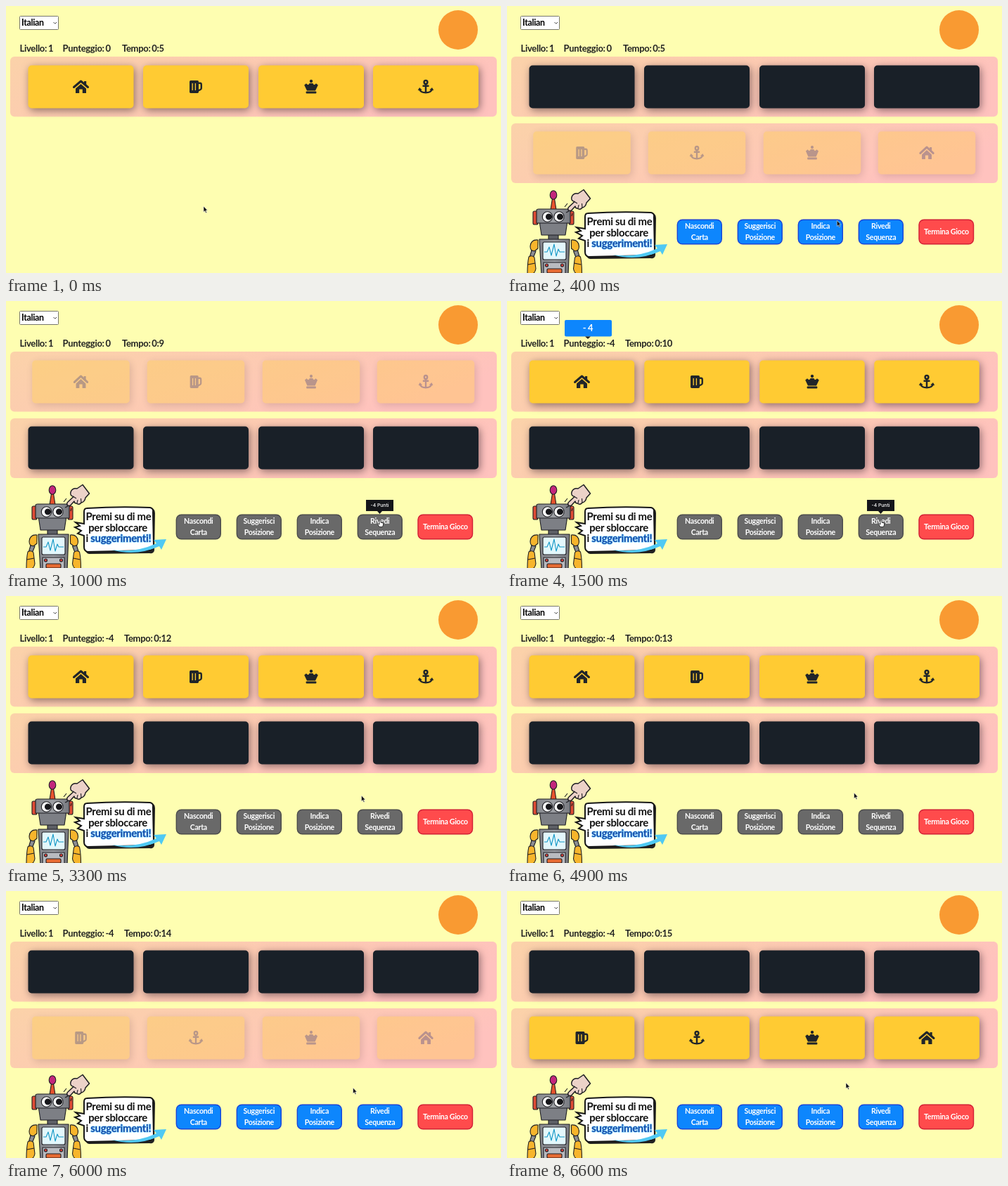
An HTML page that plays this animation: 704x380 px, repeating every 6700 ms.

```html
<!DOCTYPE html>
<html lang="it">
<head>
<meta charset="utf-8">
<style>
  html, body { margin: 0; width: 100%; height: 100%; overflow: hidden; background: #fefeb1; }
  svg { display: block; width: 704px; height: 380px; font: 700 13px Lato, "Open Sans", sans-serif; letter-spacing: -.3px; }
  .card { filter: drop-shadow(2px 3px 6px rgba(60, 40, 50, .58)); }
  .btn text { font-size: 10.6px; fill: #fff; text-anchor: middle; }
  .ink { stroke: #1d1d22; stroke-width: 1.1; stroke-linejoin: round; }
</style>
</head>
<body>
<svg id="stage" viewBox="0 0 704 380">
  <defs>
    <linearGradient id="peach" x1="0" y1="0" x2="1" y2=".35">
      <stop offset="0" stop-color="#fbd2a9"/><stop offset=".6" stop-color="#fdc9b4"/><stop offset="1" stop-color="#ffc2be"/>
    </linearGradient>
    <linearGradient id="metal"><stop offset="0" stop-color="#85878c"/><stop offset=".5" stop-color="#9c9ea3"/><stop offset="1" stop-color="#77797f"/></linearGradient>
    <g id="house" fill="#212529">
      <path d="M-10 .5 L0 -8 L10 .5" fill="none" stroke="#212529" stroke-width="3" stroke-linecap="round" stroke-linejoin="round"/>
      <path d="M4.5-8H7.7V-2L4.5-4.5Z M-7.5 2.4 L0-4 L7.5 2.4V9H2.3V3.5H-2.3V9H-7.5Z"/>
    </g>
    <g id="beer" fill="#212529">
      <rect x="-9" y="-9" width="13" height="18" rx="1.7"/>
      <path d="M3-5.2H6Q7.8-5.2 7.8-3V2Q7.8 3.4 6.5 4L3 5.6" fill="none" stroke="#212529" stroke-width="2.4"/>
      <path d="M-4.8-5V5M-.6-5V5" stroke="#ffcb33" stroke-width="1.3"/>
    </g>
    <g id="queen" fill="#212529">
      <circle cy="-8" r="2.2"/>
      <path d="M-9.8-2.6 L-7-4.8 L-5-3 Q-3-2.6-2.5-5H2.5Q3-2.6 5-3L7-4.8 L9.8-2.6 L6 5.4H-6Z"/>
      <rect x="-7.4" y="6.4" width="14.8" height="3.2" rx="1"/>
    </g>
    <g id="anchor" fill="none" stroke="#212529" stroke-width="2.5">
      <circle cy="-6.5" r="2.4"/>
      <path d="M0-4V8M-4.5-1.2H4.5M-9 3.5Q-7.5 8.3 0 8.3Q7.5 8.3 9 3.5"/>
      <path d="M-10.8 4.8L-9 1.5L-5.8 4.2ZM10.8 4.8L9 1.5L5.8 4.2Z" fill="#212529" stroke-width=".6"/>
    </g>
    <g id="arm">
      <path d="M-23 333Q-33 332-34 342Q-34 349-28 349L-23 345Z" fill="#f7b52c"/>
      <path d="M-32 348L-35 358L-30 359L-26 349Z" fill="#8b8d92"/>
      <path d="M-36 357Q-31 354-28 358L-26 374Q-27 380-32 382L-38 382Q-38 366-36 357Z" fill="#f7b52c"/>
      <path d="M-37 368L-27 366" fill="none"/>
    </g>
  </defs>

  <rect width="704" height="380" fill="#fefeb1"/>
  <rect x="19.5" y="14.5" width="55" height="19" rx="1" fill="#fff" stroke="#77776b"/>
  <text x="22" y="28.3" font-size="12.4">Italian</text>
  <path d="M67.5 23L69.8 25.3L72 23" fill="none" stroke="#444"/>
  <circle cx="643" cy="34" r="28" fill="#f99a32"/>

  <g fill="#222" word-spacing="-1">
    <text x="19.5" y="65">Livello: 1</text>
    <text id="score" x="80.5" y="65"></text>
    <text id="time" y="65"></text>
  </g>

  <rect x="6" y="72" width="692" height="85.5" rx="6" fill="url(#peach)"/>
  <g id="top"></g>

  <g id="play">
    <rect x="6" y="167" width="692" height="85" rx="6" fill="url(#peach)"/>
    <g id="bottom"></g>

    <g id="robot" class="ink">
      <use href="#arm" x="67"/>
      <use href="#arm" transform="translate(68.5 0) scale(-1 1)"/>
      <rect x="59" y="325" width="14" height="8" fill="#5e6066"/>
      <path d="M46 332H89L87 383H49Z" fill="url(#metal)"/>
      <rect x="51" y="336" width="33" height="25" rx="2" fill="#e3f7fb"/>
      <path d="M53 350H57L60 343L63 355L67 339L70 356L73 346L75 350H82" fill="none" stroke="#1598c6"/>
      <rect x="52" y="365" width="31" height="16" fill="#b9bbc0"/>
      <circle cx="56.5" cy="369" r="2" fill="#e9443d"/><circle cx="78.5" cy="369" r="2" fill="#e9443d"/>
      <rect x="57" y="374" width="21" height="6" rx="1.5" fill="#e66a32"/>
      <path d="M64.5 274H67.5L70 290H62Z" fill="#e8532d"/>
      <ellipse cx="66" cy="269" rx="4.8" ry="6.2" fill="#c3267c"/>
      <rect x="37" y="292" width="7" height="19" rx="2" fill="#df4c35"/>
      <rect x="88" y="292" width="7" height="19" rx="2" fill="#df4c35"/>
      <path d="M46 306H86L83 326H49Z" fill="#7d7f85"/>
      <path d="M42 291Q42 289 45 289H87Q90 289 90 291V309H42Z" fill="url(#metal)"/>
      <circle cx="57.5" cy="300" r="7.2" fill="#fff"/><circle cx="74" cy="300" r="7.2" fill="#fff"/>
      <circle cx="59.5" cy="300" r="4" fill="#16161a"/><circle cx="75.5" cy="300" r="4" fill="#16161a"/>
    </g>

    <g class="ink" stroke-width="1.5">
      <path d="M87.5 291Q85.5 288 88.5 285.5L96 278.5Q90.5 277 92 272Q94 266 101 267L109 261.5L118.5 274L113 280Q112 286 107 287Q104 291 100 288Q97 288 97 285L91 291.5Z" fill="#ecd2c8" style="stroke-width:1.5"/>
      <path d="M96 278.5L100 281M101 288L102 283M107 287L106.5 281" fill="none"/>
      <path d="M82 286L86 281M84 294L88 292M93 295L92 299" fill="none"/>
    </g>

    <path d="M116 297L207 295Q212 296 212 302L211 355Q210 360 204 359L118 360Q113 359 113 352Z" fill="#222"/>
    <path d="M115 295Q160 292 205 294Q210 295 209 301L210 349Q209 355 203 355L116 357Q111 356 111 350V334L102 331L107 327L98 322L105 320L99 315L111 317V300Q111 295 115 295Z" fill="#fff" stroke="#161616" stroke-width="2"/>
    <path d="M150 354Q184 359 214 345L210 340L228 339L221 354L218 349Q185 364 150 354Z" fill="#4fc9f3"/>
    <g font-size="14.9" text-anchor="middle" fill="#111">
      <text x="160" y="312">Premi su di me</text>
      <text x="159" y="328">per sbloccare</text>
      <text x="160" y="343">i <tspan fill="#1549a8" stroke="#8fdcff" stroke-width="1.4" paint-order="stroke">suggerimenti!</tspan></text>
    </g>
    <g id="buttons"></g>
  </g>

  <g id="popup" text-anchor="middle">
    <rect x="82" y="27" width="67" height="23.5" rx="2" fill="#0d86fd"/>
    <path d="M111 50.5H119L115 54Z" fill="#222"/>
    <text x="115" y="43" fill="#fff">- 4</text>
  </g>
  <g id="tip">
    <path d="M512 283H551V299H535L531.5 303L528 299H512Z" fill="#15161a"/>
    <text x="531.5" y="293.4" fill="#fff" font-family="Inter, sans-serif" font-weight="500" font-size="6.8" letter-spacing="0" text-anchor="middle">-4 Punti</text>
  </g>
  <path id="arrow" d="M0 0V8.2L1.9 6.5L3.2 9.5L4.5 9L3.2 6H5.6Z" fill="#111" stroke="#fff" stroke-width=".5"/>
  <path id="hand" d="M-1 0Q.2-1 1 0V3.2L4.5 4V7L3.3 9.5H-.8L-3.5 5.8L-2.6 5L-1 6Z" fill="#fff" stroke="#111" stroke-width=".8"/>
</svg>
<script>
const LOOP = 6700, STEP = 100;
const START = 100, HOVER = 500, REVIEW = 700, PENALTY = 1400, LEAVE = 2500, RETURN = 5700;
const CARD_X = [31.5, 195, 359, 522];
const TOP_ICONS = ["house", "beer", "queen", "anchor"];
const BOTTOM_ICONS = ["beer", "anchor", "queen", "house"];
const SECONDS = [[0, 5], [500, 9], [1400, 10], [2300, 11], [3300, 12], [4300, 13], [5300, 14], [6400, 15]];
const FLIP = [[0, 90], [.4, -20], [.6, 10], [.8, -5], [1, 0]];
const POINTER = [[0, 281, 285], [100, 281, 285], [500, 532, 312], [2500, 532, 312], [2800, 505.5, 284],
  [3900, 505.5, 284], [4100, 493.5, 282], [4800, 493.5, 282], [4900, 493.5, 280], [6300, 493.5, 280], [6600, 482, 273]];

const $ = id => document.getElementById(id);
const show = (id, on) => $(id).style.display = on ? "" : "none";
const lerp = (a, b, k) => a + (b - a) * k;
const easeIn = k => k ** 1.7;

// Interpolates rows of [position, ...values].
function along(rows, at, ease = k => k) {
  const i = rows.findIndex(row => row[0] > at);
  if (i < 0) return rows.at(-1).slice(1);
  const [a, b] = [rows[i - 1], rows[i]];
  const k = ease((at - a[0]) / (b[0] - a[0]));
  return a.slice(1).map((v, j) => lerp(v, b[j + 1], k));
}

function buildRow(id, y, icons) {
  $(id).innerHTML = CARD_X.map((x, i) => `<g transform="translate(${x + 75} ${y})"><g class="card">
    <rect x="-75" y="-30.5" width="150" height="61" rx="5"/><use href="#${icons[i]}"/></g></g>`).join("");
}

function buildButtons() {
  const labels = [["Nascondi", "Carta"], ["Suggerisci", "Posizione"], ["Indica", "Posizione"], ["Rivedi", "Sequenza"]];
  $("buttons").innerHTML = labels.map(([a, b], i) => `<g class="btn" transform="translate(${242 + 86 * i} 304)">
    <rect class="help" x=".3" y=".3" width="63" height="34.5" rx="7" stroke-width="1.4"/>
    <text x="31.8" y="13">${a}</text><text x="31.8" y="28.8">${b}</text></g>`).join("") +
    `<g class="btn"><rect x="586" y="304.3" width="77.5" height="34.5" rx="7" fill="#ff4b4c" stroke="#d21f35" stroke-width="1.4"/>
    <text x="625" y="325">Termina Gioco</text></g>`;
}

function drawRow(id, faceUp, age) {
  const p = Math.max(0, Math.min(1, age / 1000));
  const [angle] = faceUp ? along(FLIP, p, easeIn) : [0];
  const opacity = faceUp ? easeIn(Math.min(1, p / .6)) : 1;
  for (const card of $(id).querySelectorAll(".card")) {
    card.setAttribute("transform", `scale(${Math.max(.001, Math.cos(angle * Math.PI / 180))} 1)`);
    card.setAttribute("opacity", opacity);
    card.firstElementChild.setAttribute("fill", faceUp ? "#ffcb33" : "#192028");
    card.lastElementChild.style.display = faceUp ? "" : "none";
  }
}

function draw(t) {
  const reviewing = t >= REVIEW && t < RETURN;
  const hovering = t >= HOVER && t < LEAVE;
  const penalized = t >= PENALTY;

  drawRow("top", t < START || reviewing, reviewing ? t - REVIEW : 1000);
  const shownAt = t >= RETURN ? RETURN : START;
  drawRow("bottom", !reviewing, t < RETURN && t >= HOVER ? 1000 : t - shownAt);
  show("play", t >= START);

  for (const rect of document.querySelectorAll(".help")) {
    rect.setAttribute("fill", reviewing ? "#696969" : "#0d86fd");
    rect.setAttribute("stroke", reviewing ? "#4c4c4c" : "#1b45d8");
  }

  $("score").textContent = "Punteggio: " + (penalized ? -4 : 0);
  $("time").textContent = "Tempo: 0:" + SECONDS.findLast(row => row[0] <= t)[1];
  $("time").setAttribute("x", penalized ? 168 : 165);
  show("popup", penalized && t < 2700);
  show("tip", hovering);
  show("hand", hovering);
  show("arrow", !hovering);
  const place = `translate(${along(POINTER, t).join(" ")})`;
  $("hand").setAttribute("transform", place);
  $("arrow").setAttribute("transform", place);
}

buildRow("top", 115, TOP_ICONS);
buildRow("bottom", 209, BOTTOM_ICONS);
buildButtons();
const origin = performance.now();
function tick() {
  const t = (performance.now() - origin) % LOOP;
  draw(Math.floor(t / STEP) * STEP);
  requestAnimationFrame(tick);
}
tick();
</script>
</body>
</html>
```
